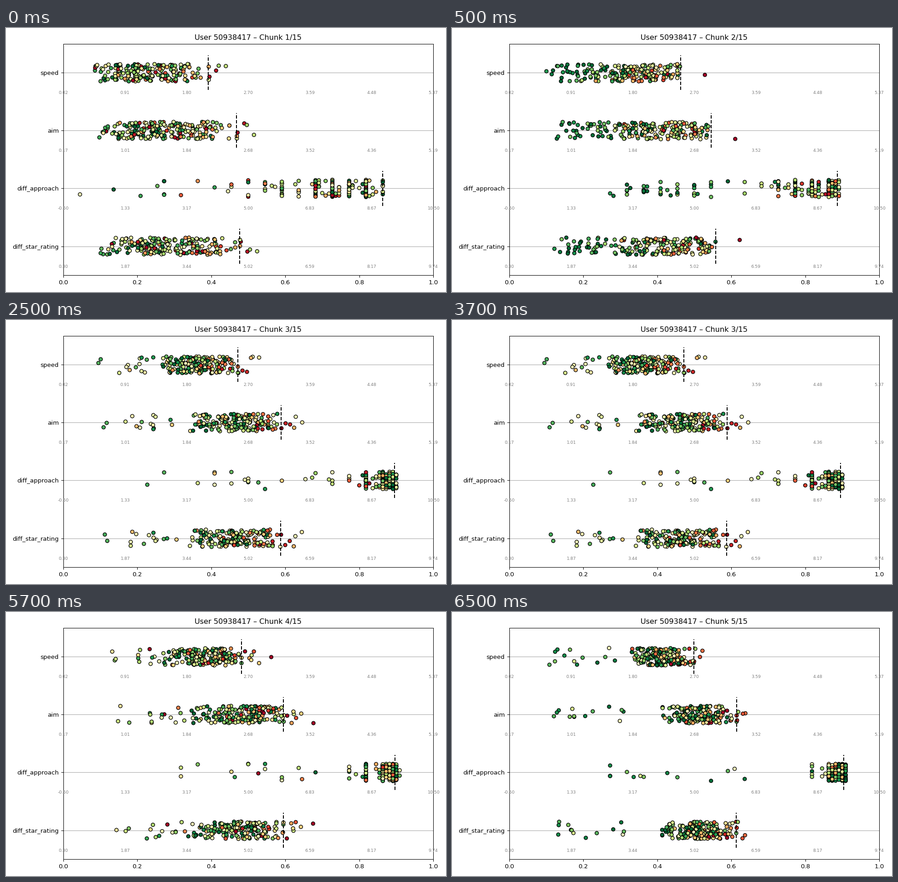
These frames come from a looping animation (966x580 px, 8000 ms). A matplotlib script:

```python
import numpy as np
import matplotlib.pyplot as plt
from matplotlib.animation import FuncAnimation

DPI = 100
SCALE = 0.966  # every default size is drawn slightly reduced
MAPS = 200
JITTER = 0.15
FEATURES = [("speed", 0.021, 5.37), ("aim", 0.17, 5.1925),
            ("diff_approach", -0.5, 10.5), ("diff_star_rating", 0.2955, 9.743)]

# Dashed limit of each feature, chunk by chunk
LIMITS = [(0.3925, 0.4635, 0.4720, 0.4815, 0.4985),
          (0.4685, 0.5455, 0.5885, 0.5955, 0.6145),
          (0.8636, 0.8865, 0.8950, 0.8960, 0.9035),
          (0.4770, 0.5575, 0.5875, 0.5945, 0.6135)]
WIDTHS = (0.36, 0.27, 0.245, 0.245, 0.20)         # extent of the main cloud
APPROACH_GAPS = (1.7, 0.85, 0.6, 0.45, 0.3)       # mean distance below the limit
SHADES = (4.3, 4.2, 4.0, 3.4, 3.4)                # 0 green to 10 red
# Easy maps: count, lowest, most common and highest position, mean shade
EASY = [(6, 0.08, 0.10, 0.14, 1), (40, 0.09, 0.20, 0.31, 0.8),
        (15, 0.04, 0.22, 0.33, 3), (16, 0.13, 0.32, 0.36, 4),
        (13, 0.09, 0.14, 0.36, 1)]

plt.rcParams.update({
    "font.size": 10 * SCALE, "axes.titlepad": 6 * SCALE,
    "axes.linewidth": 0.8 * SCALE, "lines.linewidth": 1.5 * SCALE,
    **{f"{axis}tick.major.{key}": value * SCALE for axis in "xy"
       for key, value in (("size", 3.5), ("pad", 3.5), ("width", 0.8))},
})
cmap = plt.get_cmap("RdYlGn_r")


def snap_approach(value, rng):
    """Most approach rates are whole or half, the rest are tenths."""
    half = (rng.random(len(value)) < 0.8) & (value < 9.05)
    return np.where(half, np.round(value * 2) / 2, np.round(value, 1))


def make_chunk(chunk):
    """Offsets of the four rows and the colours that the rows share."""
    rng = np.random.default_rng(40 + chunk)
    easy_count, low, mode, high, easy_shade = EASY[chunk]
    count = MAPS - easy_count
    easy = rng.triangular(low, mode, high, easy_count)
    ease = rng.beta(1.9, 1.9, count)
    beyond = rng.random(count) < 0.025
    overshoot = rng.exponential(0.025, count)

    rows = []
    for row, limits in enumerate(LIMITS):
        limit = limits[chunk]
        if row == 2:
            gap = rng.gamma(1.8, APPROACH_GAPS[chunk] / 1.8, count)
            rate = np.concatenate([20 * easy, limit * 11 - 0.4 - gap])
            x = (snap_approach(np.clip(rate, 0, 9.5), rng) + 0.5) / 11
        else:
            reach = 0.85 if row == 0 else 1
            near = np.clip(ease + rng.normal(0, 0.05, count), 0, 1)
            main = limit - WIDTHS[chunk] * reach * near
            main = np.where(beyond, limit + overshoot, main)
            start = easy * (0.88 if row == 0 else 1)
            x = np.concatenate([start + rng.normal(0, 0.008, easy_count), main])
        y = row + rng.uniform(-JITTER, JITTER, MAPS)
        rows.append(np.column_stack([x, y]))

    shade = np.concatenate([
        rng.normal(easy_shade, 1.8, easy_count),
        rng.normal(SHADES[chunk] + 3 * (0.5 - ease) + 3 * beyond, 2.8)])
    return rows, cmap(np.clip(shade, 0, 10) / 10)


def chunk_title(chunk):
    return f"User 50938417 – Chunk {chunk + 1}/15"


chunks = [make_chunk(chunk) for chunk in range(5)]

fig, ax = plt.subplots(figsize=(9.66, 5.8), dpi=DPI)
ax.set_xlim(0, 1)
ax.set_ylim(3.5, -0.5)
ax.set_yticks(range(4), [name for name, _, _ in FEATURES])
title = ax.set_title(chunk_title(0))

dots, limit_lines = [], []
for row, (_, low, high) in enumerate(FEATURES):
    ax.axhline(row, color="gray", lw=0.8 * SCALE, alpha=0.7, zorder=0.5)
    for part in np.linspace(0, 1, 7):
        ax.text(part, row + 0.35, f"{low + (high - low) * part:.2f}",
                fontsize=7 * SCALE, color="gray", ha="center", va="center")
    dots.append(ax.scatter([], [], s=32, edgecolors="black", linewidths=SCALE))
    limit_lines += ax.plot([0, 0], [row + 0.3, row - 0.3], "k--")
fig.tight_layout()


def update(step):
    chunk = (step + 3) // 4
    rows, colors = chunks[chunk]
    title.set_text(chunk_title(chunk))
    for row, offsets in enumerate(rows):
        dots[row].set_offsets(offsets)
        dots[row].set_facecolors(colors)
        limit_lines[row].set_xdata([LIMITS[row][chunk]] * 2)
    return [title, *dots, *limit_lines]


anim = FuncAnimation(fig, update, frames=16, interval=500, repeat=True,
                     repeat_delay=0, blit=False)
plt.show()
```
